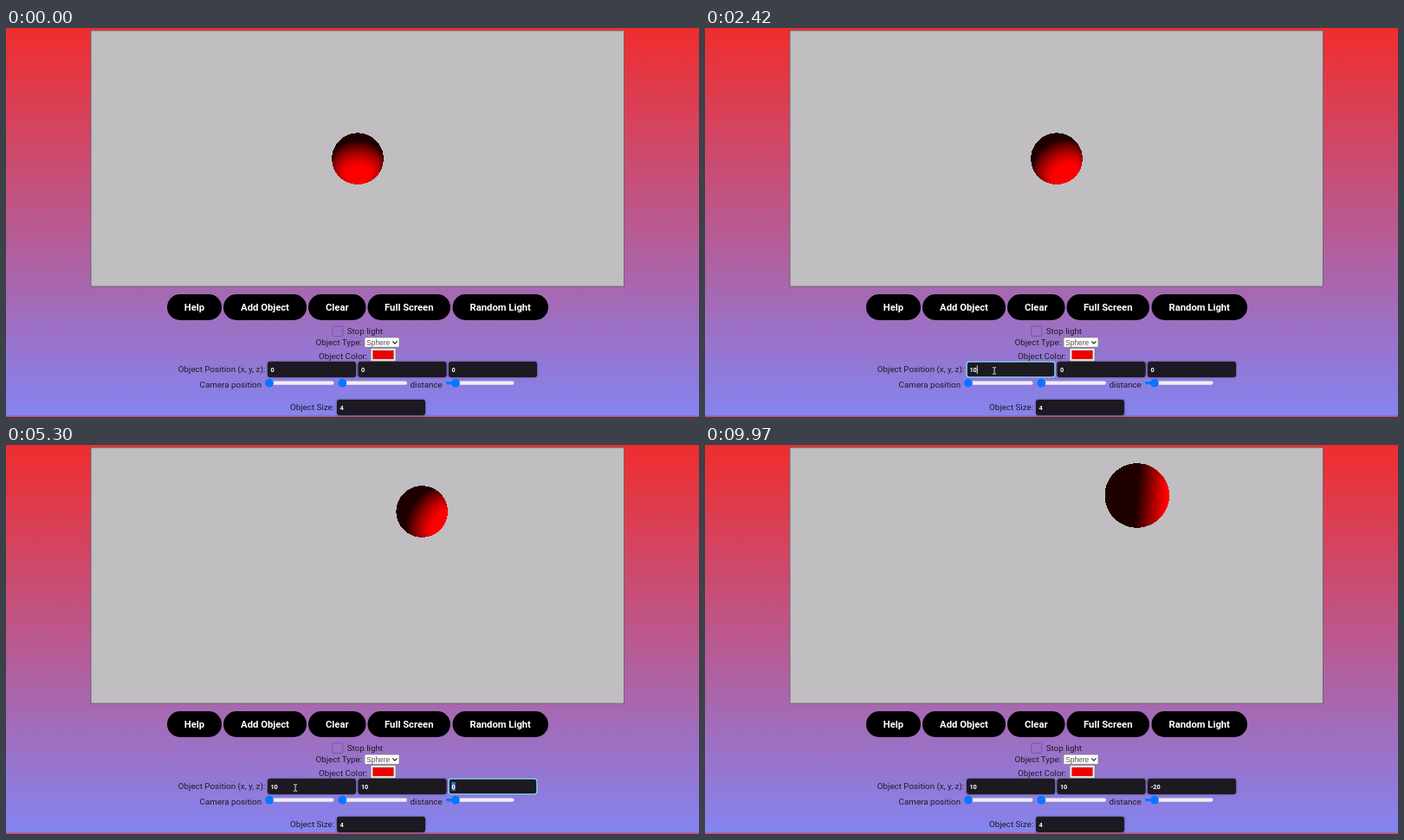
An HTML page with a canvas for the animation above (10 s loop, 800x450 px).

```html
<!DOCTYPE html>
<html lang="en">
<head>
<meta charset="utf-8">
<title>Sphere shading demo</title>
<style>
html, body { margin: 0; width: 100%; height: 100%; overflow: hidden; background: #8484f0; }
svg, canvas { position: absolute; left: 0; top: 0; display: block; }
.label { font: 9.8px Roboto, sans-serif; fill: #1f1b24; }
.button { font: bold 11.25px Roboto, sans-serif; fill: #fff; }
.value { font: bold 7.3px Roboto, sans-serif; fill: #fff; }
.option { font: 8.4px "Liberation Sans", Arial, sans-serif; fill: #555; }
</style>
</head>
<body>
<svg id="stage" width="800" height="450" viewBox="0 0 800 450">
  <defs>
    <linearGradient id="sky" x1="0" y1="0" x2="0" y2="1">
      <stop offset="0" stop-color="#f02d2d"/>
      <stop offset="1" stop-color="#8484f0"/>
    </linearGradient>
    <filter id="soft" x="-10%" y="-40%" width="120%" height="180%">
      <feGaussianBlur stdDeviation="1"/>
    </filter>
  </defs>
  <rect width="800" height="448.5" fill="url(#sky)"/>
  <rect y="448.5" width="800" height="1.5" fill="#c44f7c"/>
  <rect x="98" y="3" width="615.5" height="296" fill="#c0bec0" stroke="#66606a" stroke-width="0.9"/>
</svg>
<canvas id="ball" width="80" height="80"></canvas>
<script>
const LOOP = 10000;
const stage = document.getElementById("stage");
const ball = document.getElementById("ball");
const ctx = ball.getContext("2d");
const pixels = ctx.createImageData(80, 80);

function add(tag, attrs, text) {
  const el = document.createElementNS("http://www.w3.org/2000/svg", tag);
  set(el, attrs);
  if (text) el.textContent = text;
  stage.appendChild(el);
  return el;
}
function set(el, attrs) {
  for (const k in attrs) el.setAttribute(k, attrs[k]);
}
function label(x, y, text) {
  add("text", { x, y, class: "label" }, text);
}
const clamp = v => Math.max(0, Math.min(1, v));

// Buttons
[["Help", 186, 249], ["Add Object", 251, 347], ["Clear", 349, 415.5],
 ["Full Screen", 417.5, 513], ["Random Light", 515.5, 626]].forEach(([text, a, b]) => {
  add("rect", { x: a, y: 308, width: b - a, height: 30, rx: 15, fill: "#000" });
  add("text", { x: (a + b) / 2, y: 327, class: "button", "text-anchor": "middle" }, text);
});

// Form
add("rect", { x: 376.8, y: 345, width: 12, height: 11.5, rx: 1.2, fill: "none", stroke: "#7457a6" });
label(393.7, 354, "Stop light");
label(357.5, 366.5, "Object Type:");
add("rect", { x: 414, y: 358, width: 40, height: 11.3, rx: 1, fill: "#fff", stroke: "#767676", "stroke-width": 0.7 });
add("text", { x: 416.2, y: 366.6, class: "option" }, "Sphere");
add("path", { d: "M446.3 362.4l2.6 2.7 2.6-2.7", fill: "none", stroke: "#222", "stroke-width": 1.3 });
label(361, 382.5, "Object Color:");
add("rect", { x: 421, y: 370.3, width: 29, height: 15.4, fill: "#efefef", stroke: "#767676", "stroke-width": 0.7 });
add("rect", { x: 423.5, y: 373, width: 24, height: 10, fill: "#f00000", stroke: "#777", "stroke-width": 0.4 });
label(198.8, 398.4, "Object Position (x, y, z):");
label(223.6, 416, "Camera position");
label(466.5, 416, "distance");
label(328, 442.3, "Object Size:");

function slider(x, knob) {
  add("rect", { x, y: 408.4, width: 79, height: 4.4, rx: 2.2, fill: "#efefef" });
  add("rect", { x, y: 408.4, width: knob - x, height: 4.4, rx: 2.2, fill: "#0a75ff" });
  add("circle", { cx: knob, cy: 410.7, r: 4.9, fill: "#0a75ff" });
}
slider(299.5, 304);
slider(384, 388.3);
slider(507.5, 519);

function field(x, y, text) {
  const box = { x, y, width: 102, height: 18, rx: 3 };
  add("rect", { ...box, fill: "#1c1a20", opacity: 0.7, filter: "url(#soft)" });
  add("rect", { ...box, fill: "#1c1a20" });
  const ring = add("rect", { ...box, fill: "none", stroke: "#8fcdf5", "stroke-width": 1.6, opacity: 0 });
  const mark = add("rect", { x: x + 3.2, y: y + 4, width: 4.6, height: 10, fill: "#3d70cf", opacity: 0 });
  const value = add("text", { x: x + 3.4, y: y + 12.1, class: "value" }, text);
  return { x, ring, mark, value };
}
const fields = [302, 406.5, 511].map(x => field(x, 386, "0"));
field(382, 430, "4");
const caret = add("rect", { y: 390.5, width: 0.9, height: 9.5, fill: "#fff" });
const beam = add("path", { d: "M-2-4q2 0 2 1q0-1 2-1M0-3V3M-2 4q2 0 2-1q0 1 2 1", fill: "none", stroke: "#eee", "stroke-width": 0.9 });
const arrow = add("path", { d: "M0 0V9.5L2.2 7.5 3.7 11 5.2 10.3 3.7 7H6.7Z", fill: "#fff", stroke: "#000", "stroke-width": 0.7 });

// Keystrokes: time, field, text, whole value selected
const keys = [
  [1180, 0, "0"], [1700, 0, ""], [1950, 0, "1"], [2150, 0, "10"],
  [2650, 1, "0", true], [3420, 1, "1"], [3640, 1, "10"],
  [4080, 2, "0", true], [7200, 2, ""], [7600, 2, "-"], [7800, 2, "-2"], [8000, 2, "-20"],
  [8150, 2, "-20"]
];
const focus = [[1180, 2650], [2650, 4080], [4080, 9450]];

// Light direction over time: time, x, y (down), z (towards viewer)
const lights = [
  [0, 0.03, 0.71, 0.7], [1240, 0.16, 0.7, 0.69], [3450, 0.54, 0.58, 0.6],
  [5300, 0.78, 0.46, 0.42], [7300, 0.94, 0.26, 0.2], [8450, 0.96, 0.16, 0.17],
  [10000, 0.99, 0.08, 0]
];
function lightAt(t) {
  let i = 0;
  while (i < lights.length - 2 && t >= lights[i + 1][0]) i++;
  const a = lights[i], b = lights[i + 1], u = (t - a[0]) / (b[0] - a[0]);
  const v = [1, 2, 3].map(k => a[k] + (b[k] - a[k]) * u);
  const len = Math.hypot(...v);
  return v.map(c => c / len);
}

function drawBall(t) {
  const scale = t < 8150 ? 1 : 100 / 80;
  const cx = 406 + (t < 2650 ? 0 : 74.2) * scale;
  const cy = 151.2 - (t < 4080 ? 0 : 74.2) * scale;
  const r = 29.8 * scale;
  const left = Math.floor(cx) - 40, top = Math.floor(cy) - 40;
  const [lx, ly, lz] = lightAt(t);
  const data = pixels.data;
  for (let i = 0; i < 6400; i++) {
    const x = (left + i % 80 + 0.5 - cx) / r;
    const y = (top + Math.floor(i / 80) + 0.5 - cy) / r;
    const d = x * x + y * y;
    const lit = Math.max(0, x * lx + y * ly + Math.sqrt(Math.max(0, 1 - d)) * lz);
    data[i * 4] = 255 * Math.min(1, 0.12 + lit);
    data[i * 4 + 3] = d <= 1 ? 255 : 0;
  }
  ctx.putImageData(pixels, 0, 0);
  ball.style.left = left + "px";
  ball.style.top = top + "px";
}

function drawForm(t) {
  const texts = ["0", "0", "0"];
  let last = null;
  for (const k of keys) {
    if (t < k[0]) break;
    texts[k[1]] = k[2];
    last = k;
  }
  fields.forEach((f, i) => {
    const [a, b] = focus[i];
    const empty = texts[i] === "";
    f.value.textContent = empty ? "20" : texts[i];
    f.value.style.fill = empty ? "#77757a" : "#fff";
    f.value.style.fontWeight = empty ? 400 : 700;
    set(f.ring, { opacity: clamp((t - a) / 350) * (1 - clamp((t - b) / 350)) });
    set(f.mark, { opacity: last && last[1] === i && last[3] ? 1 : 0 });
  });
  const on = last && !last[3] && t < 9450 && (t - last[0]) % 1060 < 530;
  caret.style.display = on ? "" : "none";
  if (on) {
    const f = fields[last[1]];
    const w = last[2] ? f.value.getComputedTextLength() : 0;
    set(caret, { x: f.x + 3.4 + w });
  }
}

function drawPointer(t) {
  const enter = 1 - clamp((t - 350) / 650), leave = clamp((t - 9450) / 400);
  const y = 396.5 + 58 * (enter * enter + leave * leave);
  const x = 334 - 10 * enter - 6 * leave;
  const inside = y < 404;
  const place = { transform: `translate(${x} ${y})` };
  set(beam, place);
  set(arrow, place);
  beam.style.display = inside ? "" : "none";
  arrow.style.display = inside || y > 450 ? "none" : "";
}

const start = performance.now();
function frame() {
  const t = (performance.now() - start) % LOOP;
  drawBall(t);
  drawForm(t);
  drawPointer(t);
  requestAnimationFrame(frame);
}
frame();
</script>
</body>
</html>
```
